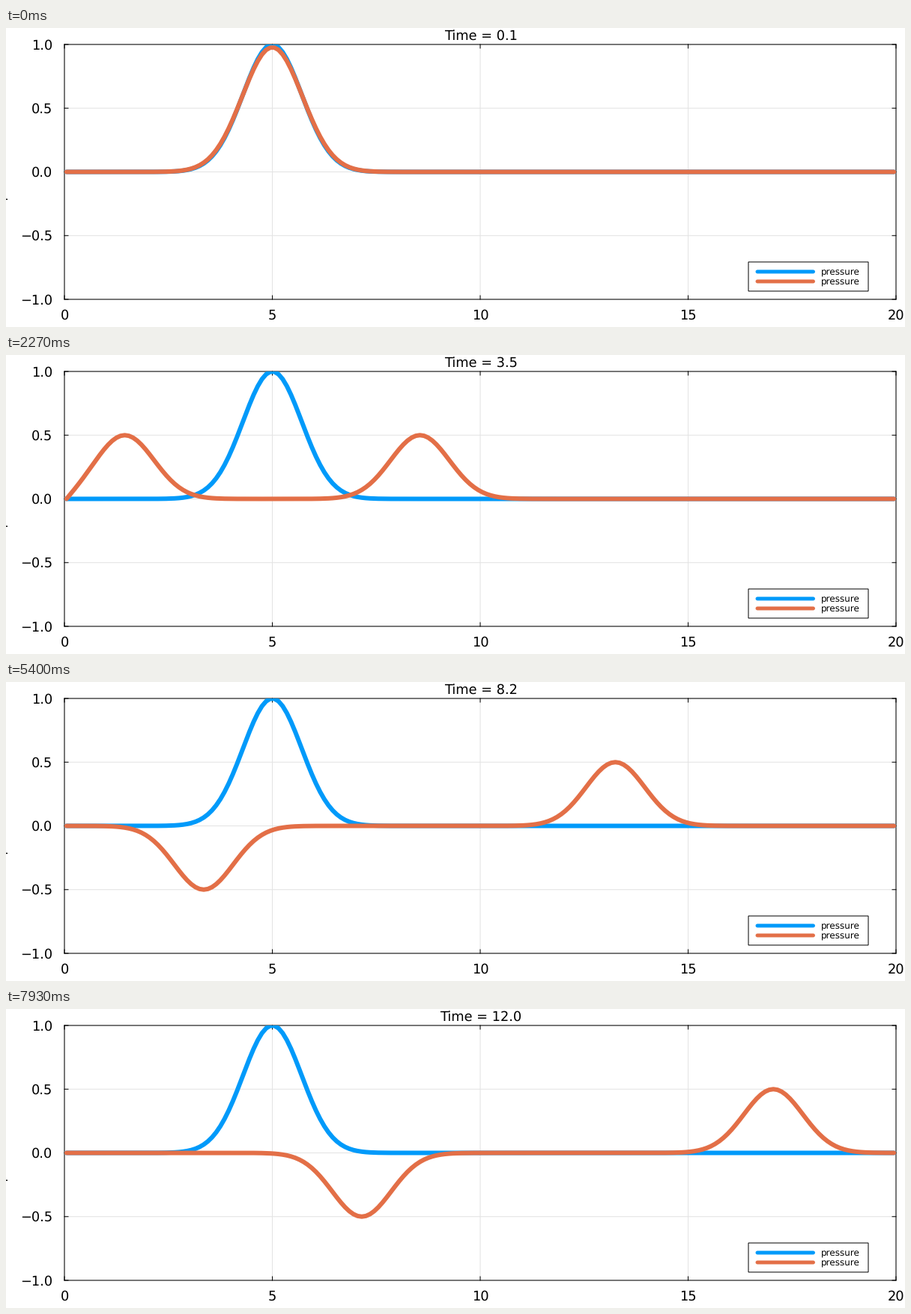
These frames come from a looping animation (1200 by 400 pixels, 8 s). A matplotlib script:

```python
import numpy as np
import matplotlib.pyplot as plt
from matplotlib.animation import FuncAnimation
from matplotlib.patches import Rectangle

W, H, DPI = 1200, 400, 100
LOOP_MS, INTERVAL = 8000, 20
STEPS_PER_MS = 15 / 1000
LEFT, RIGHT, TOP, BOTTOM = 78, 1188, 22, 363
BLUE, ORANGE = "#009afa", "#e36f47"
DX = 0.1
WALL = DX / 2

plt.rcParams.update({
    "font.family": "DejaVu Sans",
    "text.hinting": "none",
    "path.snap": False,
})


def pt(px):
    return px * 72 / DPI


def to_x(v):
    return LEFT + (RIGHT - LEFT) * v / 20


def to_y(v):
    return BOTTOM - (BOTTOM - TOP) * (v + 1) / 2


def bump(x, centre):
    return np.exp(-(x - centre) ** 2)


def pressure(x, t):
    """Pulse split in two; the left half flips sign at the wall."""
    shift = t + DX / 2
    mirrored = 2 * WALL - (5 - shift)
    return 0.5 * (bump(x, 5 + shift) + bump(x, 5 - shift) - bump(x, mirrored))


fig = plt.figure(figsize=(W / DPI, H / DPI), dpi=DPI, facecolor="white")
ax = fig.add_axes([0, 0, 1, 1])
ax.set_xlim(0, W)
ax.set_ylim(H, 0)
ax.axis("off")


def stroke(xs, ys, color, width, z, **kw):
    return ax.plot(xs, ys, color=color, lw=pt(width), zorder=z, **kw)[0]


def label(x, y, text, size=17.8, ha="center"):
    return ax.text(x, y, text, fontsize=pt(size), ha=ha, va="baseline", zorder=8)


def box(x0, y0, x1, y1, z, **kw):
    return ax.add_patch(Rectangle((x0, y0), x1 - x0, y1 - y0, zorder=z, **kw))


# Grid, ticks and tick labels
for v in range(0, 21, 5):
    x = to_x(v)
    stroke([x, x], [TOP, BOTTOM], "#e3e3e3", 1, 1)
    for edge, inward in ((TOP, 5), (BOTTOM, -5)):
        stroke([x, x], [edge, edge + inward], "black", 1, 2)
    label(x, 389.5, str(v))

for v in np.arange(-1, 1.1, 0.5):
    y = to_y(v)
    stroke([LEFT, RIGHT], [y, y], "#e3e3e3", 1, 1)
    for edge, inward in ((LEFT, 5), (RIGHT, -5)):
        stroke([edge, edge + inward], [y, y], "black", 1, 2)
    label(62.5, y + 6.5, f"{v:.1f}".replace("-", "\u2212"), ha="right")

box(LEFT, TOP, RIGHT, BOTTOM, 3, fill=False, ec="black", lw=pt(1))

# Visible sliver of the cropped axis title
box(0, 228.5, 2, 230, 3, fc="black", lw=0)

# Curves
grid = np.arange(WALL, 20, DX)
clip = Rectangle((LEFT, TOP), RIGHT - LEFT, BOTTOM - TOP, transform=ax.transData)
rounded = dict(solid_capstyle="round", solid_joinstyle="round")
start = stroke(to_x(grid), to_y(bump(grid, 5)), BLUE, 6, 4, **rounded)
wave = stroke(to_x(grid), to_y(pressure(grid, 0.1)), ORANGE, 6, 5, **rounded)
for curve in (start, wave):
    curve.set_clip_path(clip)

# Legend
box(991, 313, 1151, 352, 6, fc="white", ec="black", lw=pt(1))
for y, color in ((326, BLUE), (339, ORANGE)):
    stroke([1003, 1077.5], [y, y], color, 5, 7, **rounded)
    label(1087.5, y + 4.5, "pressure", size=12, ha="left")

title = label(633.5, 15.5, "")


def update(n):
    # Sample late in the interval, so a step is never shown behind time
    step = int((n + 0.7) * INTERVAL * STEPS_PER_MS)
    t = (step + 1) / 10
    wave.set_ydata(to_y(pressure(grid, t)))
    title.set_text(f"Time = {t:.1f}")
    return wave, title


anim = FuncAnimation(fig, update, frames=LOOP_MS // INTERVAL, interval=INTERVAL,
                     repeat=True, repeat_delay=0, blit=False)
plt.show()
```
